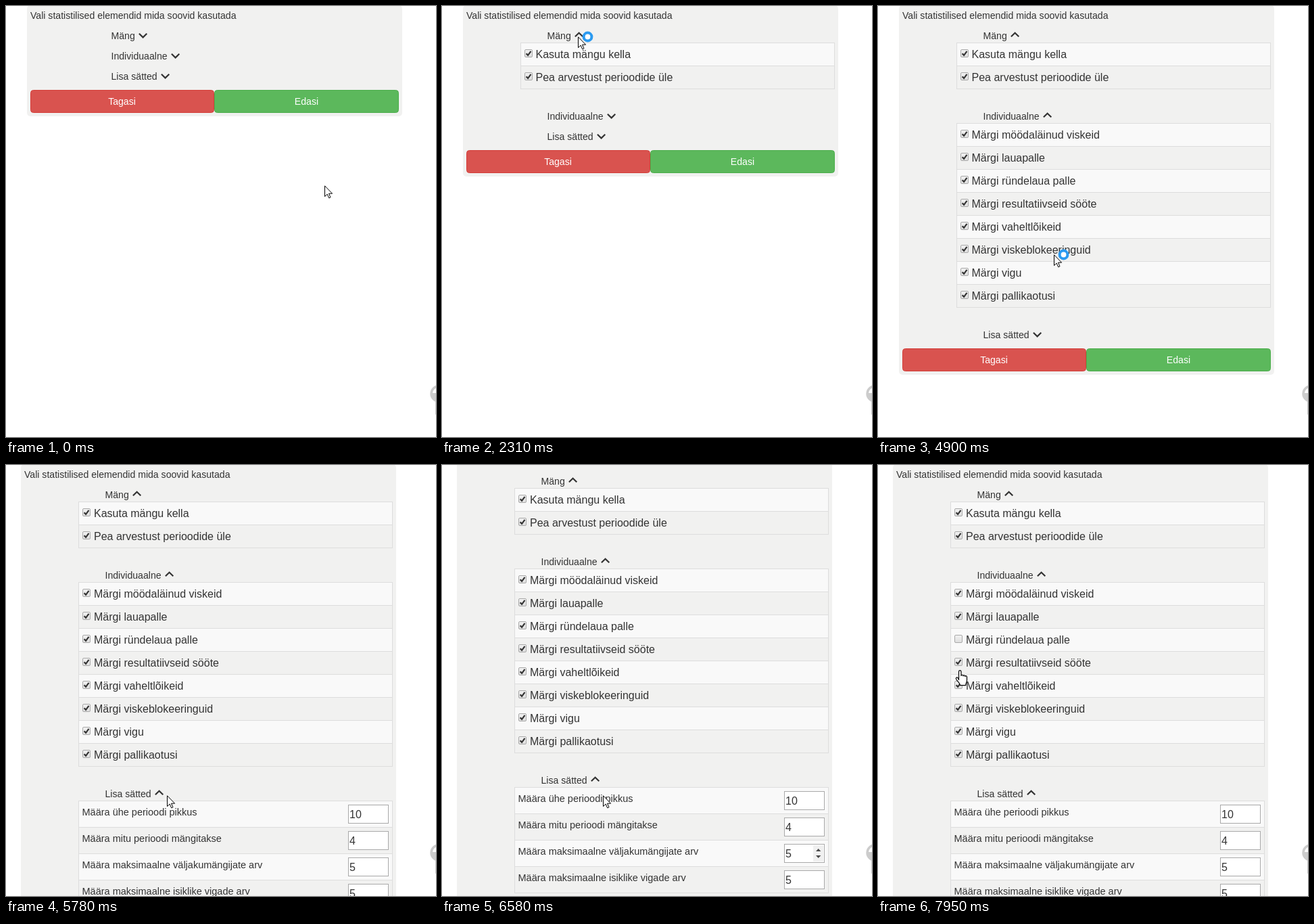
An HTML page for the animation above (8000 ms loop, 636 by 637 pixels).

```html
<!DOCTYPE html>
<html lang="et">
<head>
<meta charset="utf-8">
<title>Statistika seaded</title>
<style>
  html, body { margin: 0; width: 100%; height: 100%; overflow: hidden; background: #fff; }
  svg { display: block; width: 636px; height: 637px; }
  text { font-family: "Liberation Sans", Arial, sans-serif; font-size: 14.1px; fill: #333; white-space: pre; }
  .big { font-size: 16px; }
  .label { font-size: 14.5px; }
  .btn { fill: #fff; text-anchor: middle; }
</style>
</head>
<body>
<svg id="stage" viewBox="0 0 636 637">
  <defs>
    <linearGradient id="box" x1="0" y1="0" x2="0" y2="1">
      <stop offset="0" stop-color="#f2f2f2"/>
      <stop offset="1" stop-color="#dedede"/>
    </linearGradient>
  </defs>
</svg>
<script>
const LOOP = 8000;
const NS = "http://www.w3.org/2000/svg";
const stage = document.getElementById("stage");

function add(parent, tag, attrs = {}, content) {
  const el = document.createElementNS(NS, tag);
  set(el, attrs);
  if (content !== undefined) el.textContent = content;
  parent.appendChild(el);
  return el;
}
function set(el, attrs) {
  for (const key in attrs) el.setAttribute(key, attrs[key]);
}
const move = (el, x, y) => set(el, { transform: `translate(${x} ${y})` });
const show = (el, on) => set(el, { visibility: on ? "inherit" : "hidden" });

// Sections of the form: heading, chevron position, opening time, rows
const sections = [
  { name: "Mäng", chevron: 196, opens: 2230, rowH: 34,
    rows: ["Kasuta mängu kella", "Pea arvestust perioodide üle"] },
  { name: "Individuaalne", chevron: 244, opens: 3690, rowH: 34,
    rows: ["möödaläinud viskeid", "lauapalle", "ründelaua palle", "resultatiivseid sööte",
           "vaheltlõikeid", "viskeblokeeringuid", "vigu", "pallikaotusi"].map(s => "Märgi " + s) },
  { name: "Lisa sätted", chevron: 229, opens: 5300, rowH: 39,
    rows: ["ühe perioodi pikkus", "mitu perioodi mängitakse", "maksimaalne väljakumängijate arv",
           "maksimaalne isiklike vigade arv"].map(s => "Määra " + s),
    values: [10, 4, 5, 5] }
];
const WIDE_AT = 5300;   // the page scrollbar appears and recentres the form
const UNCHECK_AT = 7720;

const page = add(stage, "g");
const panel = add(page, "rect", { x: 31, y: -1, width: 555, rx: 5, fill: "#f1f1f0" });
add(page, "text", { x: 36, y: 19 }, "Vali statistilised elemendid mida soovid kasutada");

const labels = [];
let spinner, arrows;

function addCheckbox(parent, y) {
  add(parent, "rect", { x: 122.5, y: y + 10.5, width: 11, height: 11, rx: 1.5, fill: "url(#box)", stroke: "#a9a9a9" });
  return add(parent, "path", { d: `M124.6 ${y + 16.2}l2.5 2.6 4.4-6`, fill: "none", stroke: "#333", "stroke-width": 2.2 });
}

function addInput(parent, y, value) {
  add(parent, "rect", { x: 515.5, y: y + 6.5, width: 59, height: 27, fill: "#fff", stroke: "#a9a9a9" });
  add(parent, "text", { x: 517, y: y + 25.5, class: "big" }, value);
}

for (const s of sections) {
  s.group = add(page, "g");
  add(s.group, "text", { x: 155.5, y: 5 }, s.name);
  s.mark = add(s.group, "path", { fill: "none", stroke: "#333", "stroke-width": 2.2 });
  s.table = add(s.group, "g");
  s.ticks = [];
  s.rows.forEach((row, i) => {
    const y = 10 + i * s.rowH;
    if (i % 2 === 0) add(s.table, "rect", { x: 116, y, width: 465, height: s.rowH, fill: "#f9f9f9" });
    add(s.table, "path", { d: `M116 ${y + .5}H581`, stroke: "#ddd" });
    if (s.values) {
      add(s.table, "text", { x: 121.5, y: y + 22, class: "label" }, row);
      addInput(s.table, y, s.values[i]);
    } else {
      s.ticks.push(addCheckbox(s.table, y));
      labels.push(add(s.table, "text", { y: y + 23, class: "big" }, row));
    }
  });
  s.height = s.rows.length * s.rowH;
  add(s.table, "rect", { x: 116.5, y: 10.5, width: 464, height: s.height, fill: "none", stroke: "#ddd" });
}

// Stepper shown in the third number field
spinner = add(sections[2].table, "g", { transform: "translate(515 94)" });
add(spinner, "rect", { x: 43, y: 2, width: 15, height: 24, fill: "#f0f0f0" });
arrows = add(spinner, "path", { d: "M47 11h7.4l-3.7-4zM47 17h7.4l-3.7 4z", fill: "#4a4a4a" });

const buttons = add(page, "g");
function addButton(name, fill, stroke) {
  return {
    rect: add(buttons, "rect", { y: .5, height: 33, rx: 4, fill, stroke }),
    text: add(buttons, "text", { y: 22, class: "btn" }, name)
  };
}
const back = addButton("Tagasi", "#d9534f", "#d43f3a");
const next = addButton("Edasi", "#5cb85c", "#4cae4c");

function placeButton(b, x1, x2, mid) {
  set(b.rect, { x: x1 + .5, width: x2 - x1 - 1 });
  set(b.text, { x: mid });
}

// Fixed icon cut by the right edge
const icon = add(stage, "g", { fill: "#ccc" });
add(icon, "circle", { cx: 640, cy: 573, r: 11, fill: "#fff", stroke: "#ccc", "stroke-width": 3.5 });
add(icon, "path", { d: "M628 572h24a12 12 0 0 1-24 0z" });
add(icon, "rect", { x: 635, y: 584, width: 8, height: 20, rx: 1 });

const pointer = add(stage, "g", { fill: "#fff", stroke: "#000", "stroke-linejoin": "round" });
const arrow = add(pointer, "path", { d: "M.5.8V16.6L4.2 13.1 6.7 18.8 9 17.8 6.5 12.2H11.6Z" });
const ring = add(pointer, "circle", { cx: 14.5, cy: .5, r: 5.9, stroke: "#2b9af0", "stroke-width": 4 });
const hand = add(pointer, "path", {
  transform: "translate(-6 0)", "stroke-width": 1.2,
  d: "M5.5 14.5V2.5c0-2.4 3.5-2.4 3.5 0v6c0-1.8 3-1.6 3 .4 0-1.6 2.8-1.4 2.8.6 0-1.5 2.7-1.2 2.7.8v5c0 3-1.8 4-1.8 7.4H7.6c0-3-3-4.7-5.7-8.7-1.5-2.4.8-4 2.3-2.2z"
});

// Pointer strokes: start, end, steps, two control points, destination
const strokes = [
  [790, 1560, 11, 350, 40, 193, -55, 227, 49],
  [1640, 1970, 5, 219, 50, 208, 45, 201, 45],
  [2970, 3300, 5, 215, 80, 255, 140, 258, 165],
  [4490, 5150, 9, 272, 230, 262, 440, 238, 489],
  [5700, 5780, 2, 238, 489, 238, 488, 238, 488],
  [6730, 7140, 6, 235, 420, 135, 270, 119, 245],
  [7300, 7460, 3, 119, 249, 120, 252, 120, 256],
  [7870, 7950, 2, 120, 270, 120, 290, 120, 303]
];

function bezier(a, b, c, d, u) {
  const v = 1 - u;
  return v * v * v * a + 3 * v * v * u * b + 3 * v * u * u * c + u * u * u * d;
}

function pointerAt(t) {
  let x = 471, y = 265;
  for (const [from, to, n, x1, y1, x2, y2, x3, y3] of strokes) {
    if (t < from) break;
    const step = Math.min(n, 1 + Math.floor((t - from) / (to - from) * (n - 1) + .001));
    const u = .5 - .5 * Math.cos(Math.PI * step / n);
    x = bezier(x, x1, x2, x3, u);
    y = bezier(y, y1, y2, y3, u);
  }
  return [Math.round(x), Math.round(y)];
}

const scrolls = [[5930, 32], [6030, 80], [6130, 95], [6480, 70], [6580, 20], [6660, 0]];
const scrollAt = t => scrolls.reduce((pos, [at, value]) => t >= at ? value : pos, 0);

function draw(t) {
  const wide = t >= WIDE_AT;
  move(page, wide ? -9 : 0, -scrollAt(t));

  let y = 44;
  for (const s of sections) {
    const open = t >= s.opens;
    move(s.group, 0, y);
    show(s.table, open);
    set(s.mark, { d: `M${s.chevron + .9} ${open ? 1.3 : -3.2}l5.7 ${open ? -5.6 : 5.6} 5.7 ${open ? 5.6 : -5.6}` });
    y += open ? s.height + 51 : 30;
  }
  move(buttons, 0, y - 10);
  set(panel, { height: y + 30 });

  const split = wide ? 309 : 308;
  placeButton(back, 36, split, wide ? 172.5 : 171.5);
  placeButton(next, split, 581, 444.5);
  for (const label of labels) set(label, { x: wide ? 139 : 138.5 });

  show(sections[1].ticks[2], t < UNCHECK_AT);
  show(spinner, t >= 6130 && t < 6660);
  show(arrows, t >= 6280 && t < 6660);

  move(pointer, ...pointerAt(t));
  const pointing = t >= 7050;
  show(arrow, !pointing);
  show(hand, pointing);
  show(ring, t >= 2310 && t < WIDE_AT);
}

function tick() {
  draw(performance.now() % LOOP);
  requestAnimationFrame(tick);
}
tick();
</script>
</body>
</html>
```
